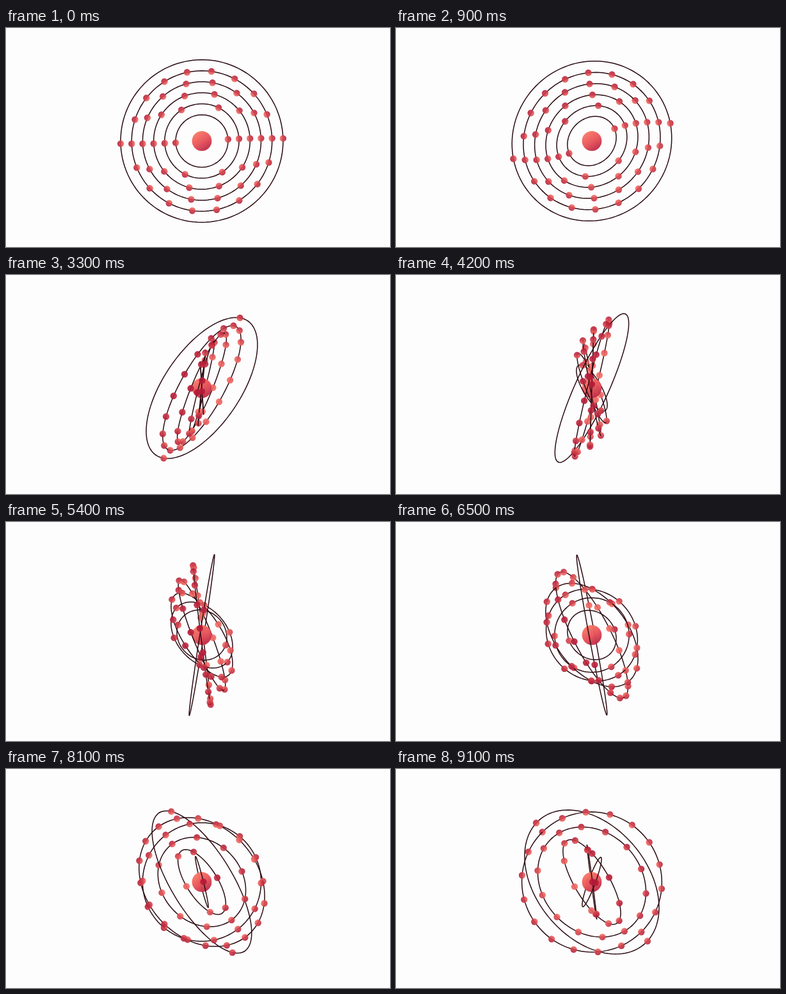
Recreate the animation shown at these times as an HTML page. Size 600 by 342 pixels, loop 9200 ms.

```html
<!DOCTYPE html>
<html lang="en">
<head>
<meta charset="utf-8">
<title>Atom</title>
<style>
  html, body { margin: 0; width: 100%; height: 100%; overflow: hidden; background: #fdfdfd; }
  svg { display: block; width: 100%; height: 100%; }
  path { fill: none; stroke: #2b0c12; stroke-width: 1.5; stroke-linecap: round; }
</style>
</head>
<body>
<svg viewBox="0 0 600 342">
  <defs>
    <linearGradient id="core" x1=".2" y1=".1" x2=".75" y2=".95">
      <stop offset="0" stop-color="#f87866"/>
      <stop offset=".5" stop-color="#e9545a"/>
      <stop offset="1" stop-color="#bd2a48"/>
    </linearGradient>
  </defs>
  <g id="atom" transform="translate(306 176.5)"></g>
</svg>
<script>
const NS = 'http://www.w3.org/2000/svg';
const LOOP = 9200, FRAME = 100, BALL = 5.2;
const LIGHT = [247, 112, 102], DARK = [178, 24, 54];
const HELD = [7, 10, 11, 32, 51, 53, 72];              // ticks on which nothing moves
const PACE = [[0, 1], [6, 3], [8, 6], [18, 15], [91, 88]]; // tick -> turn, slow start
const TURN = 1.8 * Math.PI / 180;

const atom = document.getElementById('atom');
const defs = document.querySelector('defs');

function make(tag, attrs, parent) {
  const el = document.createElementNS(NS, tag);
  set(el, attrs);
  parent.appendChild(el);
  return el;
}

function set(el, attrs) {
  for (const key in attrs) el.setAttribute(key, attrs[key]);
}

function makeBall(id) {
  const grad = make('linearGradient', { id, gradientUnits: 'userSpaceOnUse' }, defs);
  const stops = [0, 1].map(offset => make('stop', { offset }, grad));
  const el = make('circle', { r: BALL, fill: `url(#${id})`, opacity: 0.9 }, atom);
  return { el, grad, stops };
}

const counts = [2, 6, 10, 14, 18, 2];
const rings = counts.map((count, i) => ({
  radius: 41 + 17.2 * i,
  speed: 2 - 0.2 * i,
  back: make('path', {}, atom),
  front: make('path', {}, atom),
  balls: Array.from({ length: count }, (_, j) => makeBall(`b${i}-${j}`))
}));
const core = make('circle', { r: 15.4, fill: 'url(#core)', opacity: 0.96 }, atom);

function turnAt(tick) {
  const step = tick - HELD.filter(h => h <= tick).length;
  const i = PACE.findIndex(p => p[0] > step);
  const [s0, k0] = PACE[i - 1], [s1, k1] = PACE[i];
  return k0 + (k1 - k0) * (step - s0) / (s1 - s0);
}

// Point on a unit ring turned by the same angle about x, y and z.
function place(angle, phi) {
  const s = Math.sin(angle), c = Math.cos(angle);
  const p = Math.cos(phi), q = Math.sin(phi);
  return [c * p, -s * s * p + c * q, -s * c * p - s * q];
}

function halfRing(ring, angle, from) {
  let d = '';
  for (let i = 0; i <= 60; i++) {
    const [x, y] = place(angle, from + Math.PI * i / 60);
    d += `${i ? 'L' : 'M'}${(x * ring.radius).toFixed(2)} ${(y * ring.radius).toFixed(2)}`;
  }
  return d;
}

function shade(amount) {
  const m = Math.min(1, Math.max(0, amount));
  return `rgb(${DARK.map((v, i) => Math.round(v + (LIGHT[i] - v) * m))})`;
}

// Each ball is lit from the centre, so near ones show their dark side.
function drawBall(ball, [x, y, z], radius) {
  const cx = x * radius, cy = y * radius;
  const flat = Math.hypot(x, y) || 1e-6;
  const dx = x / flat * BALL, dy = y / flat * BALL;
  const mid = 0.5 - 0.5 * z;
  set(ball.el, { cx, cy });
  set(ball.grad, { x1: cx - dx, y1: cy - dy, x2: cx + dx, y2: cy + dy });
  ball.stops[0].setAttribute('stop-color', shade(mid + 0.48 * flat));
  ball.stops[1].setAttribute('stop-color', shade(mid - 0.48 * flat));
}

function draw(turn) {
  const near = [], far = [], nearLines = [], farLines = [];
  for (const ring of rings) {
    const angle = turn * TURN * ring.speed;
    const s = Math.sin(angle), c = Math.cos(angle);
    const facing = Math.atan2(-s, -s * c);
    ring.front.setAttribute('d', halfRing(ring, angle, facing - Math.PI / 2));
    ring.back.setAttribute('d', halfRing(ring, angle, facing + Math.PI / 2));
    nearLines.push(ring.front);
    farLines.push(ring.back);
    ring.balls.forEach((ball, j) => {
      const pos = place(angle, 2 * Math.PI * j / ring.balls.length - angle);
      drawBall(ball, pos, ring.radius);
      (pos[2] > 0 ? near : far).push({ el: ball.el, depth: pos[2] * ring.radius });
    });
  }
  const sorted = list => list.sort((a, b) => a.depth - b.depth).map(item => item.el);
  atom.append(...farLines, ...sorted(far), core, ...nearLines, ...sorted(near));
}

const start = performance.now();
let shown = -1;

function update() {
  const time = Math.max(0, performance.now() - start) % LOOP;
  const tick = Math.floor(time / FRAME);
  if (tick !== shown) {
    shown = tick;
    draw(turnAt(tick));
  }
  requestAnimationFrame(update);
}
update();
</script>
</body>
</html>
```
